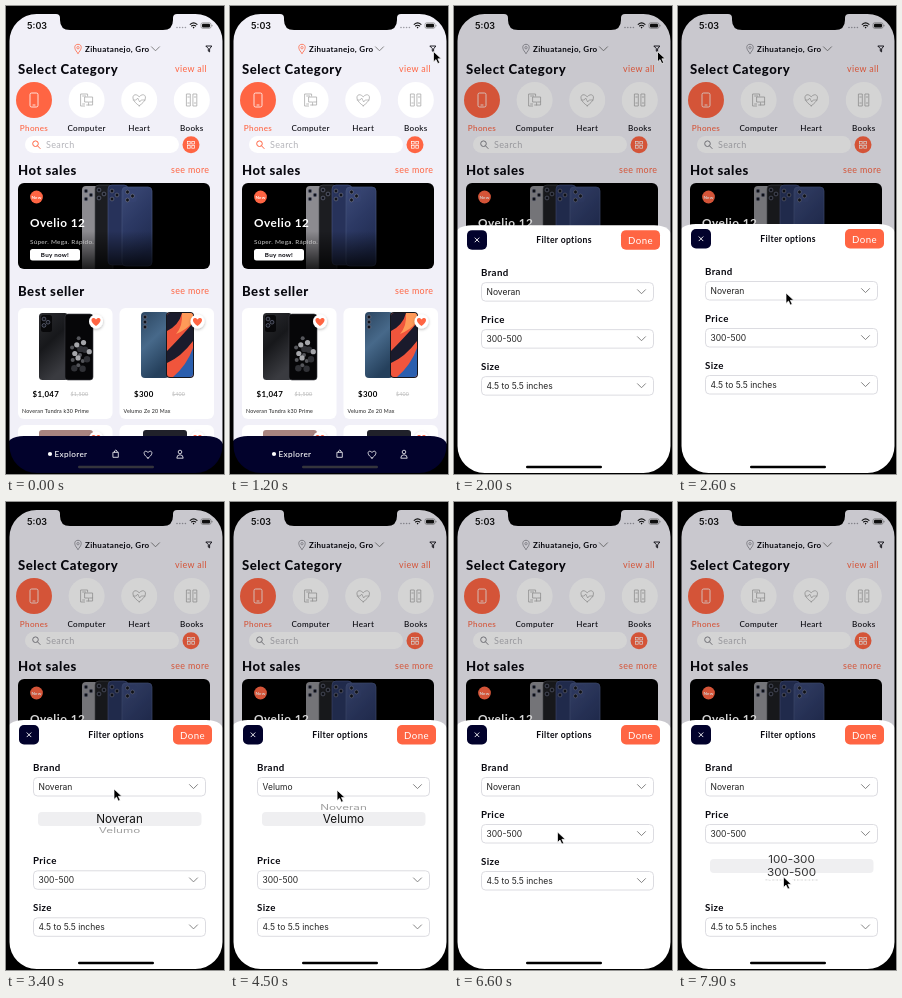
Animation of 218x468 px, one loop 8000 ms. Source, as an HTML page:

```html
<!DOCTYPE html>
<html lang="en">
<head>
<meta charset="utf-8">
<title>Phone shop filter</title>
<style>
html, body { margin: 0; width: 100%; height: 100%; overflow: hidden; background: #000; }
svg { display: block; width: 100vw; height: 100vh; }
text { font-family: Lato, sans-serif; letter-spacing: 0.04em; }
.ui { font-family: Inter, "Liberation Sans", sans-serif; letter-spacing: 0; }
.b { font-weight: 700; }
.h { font-weight: 800; }
.m { text-anchor: middle; }
.line { fill: none; stroke-linecap: round; stroke-linejoin: round; }
.tint * { stroke: var(--tint); }
</style>
</head>
<body>
<svg id="stage" viewBox="0 0 218 468"></svg>
<script>
const ORANGE = '#ff6543', NAVY = '#02022c', INK = '#08080f';
const text = (x, y, size, str, fill = INK, cls = '', extra = '') =>
  `<text x="${x}" y="${y}" font-size="${size}" fill="${fill}" class="${cls}" ${extra}>${str}</text>`;
const rect = (x, y, w, h, r, fill, extra = '') =>
  `<rect x="${x}" y="${y}" width="${w}" height="${h}" rx="${r}" fill="${fill}" ${extra}/>`;
const circle = (x, y, r, fill, extra = '') => `<circle cx="${x}" cy="${y}" r="${r}" fill="${fill}" ${extra}/>`;
const line = (d, color, width = 0.8) => `<path class="line" d="${d}" stroke="${color}" stroke-width="${width}"/>`;
const at = (x, y, body, id = '') => `<g transform="translate(${x} ${y})" ${id && `id="${id}"`}>${body}</g>`;
const tint = body => `<g class="tint">${body}</g>`;
const chevron = (x, y) => line(`M${x - 4} ${y - 2}l4 4 4-4`, '#777', 0.9);
const heart = 'M0 3.6C-7-1-3.2-5.6 0-2 3.2-5.6 7-1 0 3.6z';

function statusBar() {
  const dots = [0, 1, 2, 3].map(i => circle(171 + i * 2.8, 21.5, 0.8, '#9a9aa2')).join('');
  return text(21, 22.5, 9, '5:03', '#111', 'ui', 'font-weight="600"') + dots +
    line('M184.2 18.4q3.4-3 6.8 0M185.5 20q2.1-1.6 4.2 0', '#111', 1.1) + circle(187.6, 21.6, 0.8, '#111') +
    rect(195, 16.8, 10, 5.6, 1.7, 'none', 'stroke="#777" stroke-width=".6"') + rect(196, 17.8, 8, 3.6, 1, '#111') +
    rect(205.6, 18.7, 0.8, 1.8, 0.4, '#777');
}

function header() {
  return tint(line('M72 47.3c-5-5-3.6-9 0-9s5 4 0 9z', ORANGE) + circle(72, 41.7, 1.2, 'none', 'stroke-width=".7"')) +
    text(79, 46, 8, 'Zihuatanejo, Gro', INK, 'b') + chevron(149.5, 42.8) +
    line('M200.2 40h5.6l-2.2 2.9v3l-1.3-.8v-2.2z', INK, 0.9);
}

function categories() {
  const gray = '#aaa';
  const icons = [
    ['Phones', rect(-4, -7, 8, 14, 1.6, 'none', 'stroke="#fff" stroke-width=".8"') + line('M-1 5h2', '#fff')],
    ['Computer', line('M1-4V-6h-7v12h4M-4-4h3M-4 4h2M1 2h-3v-5h8v5h-3M2 2v3M0 5h6V2', gray)],
    ['Heart', `<g transform="scale(1.6)">${line(heart, gray, 0.5)}</g>` + line('M-6 0h3l1.5-2 2 4 1.5-2h4', gray, 0.7)],
    ['Books', line('M-5-6h3.5V6h-3.5zM1.5-6h3.5V6h-3.5zM-4-3h1.5M2.5-3h1.5M-4 3h1.5M2.5 3h1.5', gray)]
  ];
  return icons.map(([name, icon], i) => {
    const x = 28 + i * 52.6;
    return circle(x, 94, 18, i ? '#fff' : ORANGE) + at(x, 94, icon) +
      text(x, 124.8, 8.1, name, i ? INK : ORANGE, 'm', 'font-weight="500"');
  }).join('');
}

function search() {
  const tiles = [-3.4, 0.8].flatMap(x => [-3.4, 0.8].map(y =>
    rect(x, y, 2.6, 2.6, 0, 'none', 'stroke="#fff" stroke-width=".7"'))).join('');
  return rect(19, 130, 154, 17, 8.5, '#fff') +
    tint(circle(29.5, 137.7, 2.8, 'none') + line('M31.6 139.9l2.5 2.6', ORANGE, 1)) +
    text(40, 142, 9, 'Search', '#b4b4ba') + circle(185, 138.8, 8.5, ORANGE) + at(185, 138.8, tiles);
}

const title = (y, name, link, x) => text(12, y, 13.1, name, INK, 'h') + text(x, y - 1.7, 8.9, link, ORANGE);

function lens(x, y, n, gap = 5) {
  return Array.from({ length: n }, (_, i) =>
    circle(x + (i % 2) * gap, y + i * gap * 0.8, 1.9, '#11131b', 'stroke="#777d92" stroke-width=".6"')).join('');
}

function banner() {
  return `<g clip-path="url(#banner)">` + rect(12, 177, 192, 86, 0, '#000') +
    rect(76, 180, 20, 90, 4, '#8c8b90') + lens(80, 185, 3) +
    rect(89, 179, 18, 90, 4, '#1c1d21', 'stroke="#4c4d53" stroke-width=".6"') + lens(93, 184, 3) +
    rect(102, 179, 20, 80, 4, '#27325a', 'stroke="#4a5680" stroke-width=".6"') + lens(106, 185, 3) +
    rect(116, 181, 30, 79, 4, 'url(#blue)', 'stroke="#46537d" stroke-width=".7"') +
    rect(118, 183, 13, 13, 3.5, '#354270') + lens(121.5, 186, 3) +
    rect(70, 225, 80, 38, 0, 'url(#fade)') + '</g>' +
    circle(30.5, 191, 6.4, ORANGE) + text(30.5, 192.6, 4.5, 'New', '#fff', 'm b') +
    text(24, 221, 11.8, 'Ovelio 12', '#fff', 'b') + text(24, 238.3, 6.4, 'Súper. Mega. Rápido.', '#ccc') +
    rect(24, 243, 50, 11.5, 2.5, '#fff') + text(49, 251, 6.3, 'Buy now!', INK, 'm b');
}

// Bubbles packed along a golden-angle spiral.
const bubbles = Array.from({ length: 16 }, (_, i) => {
  const r = 3.1 * Math.sqrt(i), a = i * 2.4;
  return circle(74 + r * Math.cos(a) * 0.85, 349 + r * Math.sin(a) * 1.4, 2 + i % 3 * 0.6, ['#55565b', '#a5a6aa', '#303136'][i % 3]);
}).join('');
const darkPhones = rect(33, 307, 29, 67, 3.5, 'url(#dark)') + rect(35, 309, 11, 17, 2.5, '#08080a') + lens(38, 313, 3, 4) +
  rect(59, 308, 28, 66, 3, '#060608', 'stroke="#3a3b40" stroke-width=".6"') + bubbles;
const colorPhones = rect(135, 306, 28, 66, 4, 'url(#steel)') + lens(139, 311, 1) + lens(139, 316, 1) + lens(139, 321, 1) +
  rect(160, 306, 28, 66, 4, '#15161d') + rect(161, 307, 26, 64, 3, '#f0553c') +
  '<path d="M161 325V310q0-3 3-3h12q-3 12-15 18zM161 345q12-12 26-28v18q-12 16-26 22z" fill="#1a1b2c"/>' +
  '<path d="M176 307h8q3 0 3 3v6q-7 8-17 12 7-8 6-21z" fill="#ff9a58"/><path d="M187 342v26q0 3-3 3h-17q14-12 20-29z" fill="#2b5fae"/>';

function card(x, y, photo, price, old, name) {
  return rect(x, y, 94.5, 111, 6, '#fff') + photo +
    circle(x + 78, y + 13.5, 7, '#fff', 'filter="url(#soft)"') +
    at(x + 78, y + 13.8, `<path d="${heart}" fill="${ORANGE}" transform="scale(1.15)"/>`) +
    text(x + 14.5, y + 89, 7.9, price, '#000', 'b') +
    text(x + 52.5, y + 88, 5.3, old, '#bbb', '', 'text-decoration="line-through"') +
    text(x + 4, y + 105.2, 5.3, name, '#222');
}

function nav() {
  return `<path d="M0 468V444q0-14 18-14H200q18 0 18 14v24z" fill="${NAVY}"/>` +
    circle(44, 448, 2.1, '#fff') + text(48.5, 451, 8.2, 'Explorer', '#fff', '', 'font-weight="500"') +
    line('M107.3 446.3h5v5h-5zM108.5 446v-1q1.3-2 2.6 0v1', '#fff') +
    at(142, 448.5, line(heart, '#fff')) +
    circle(174, 446, 1.8, 'none', 'stroke="#fff" stroke-width=".8"') + line('M170.8 451.8q0-3 3.2-3t3.2 3z', '#fff') +
    rect(72, 459.8, 76, 2.4, 1.2, '#34343c');
}

const field = (label, y, id) => text(27, y, 9.7, label, INK, 'b') +
  rect(27.5, y + 6.5, 172, 18.5, 4, '#fff', 'stroke="#d9d9de" stroke-width=".9"') +
  text(32.5, y + 19, 8.5, '', '#222', 'ui', `id="${id}"`) + chevron(187.5, y + 15.6);

const picker = (id, items, y) => `<g id="${id}">` + rect(32, y - 7, 163.5, 14, 4, '#efeff1') +
  items.map(item => text(0, 4.2, 11.7, item, '#111', 'ui m')).join('') + '</g>';

const BRANDS = ['Noveran', 'Velumo'], PRICES = ['100-300', '300-500', '500-1000'];
const BRAND_Y = 317, PRICE_Y = 364;

function sheet() {
  return `<g id="sheet"><path d="M0 500V232q0-14 18-14H200q18 0 18 14v268z" fill="#fff"/>` +
    rect(13, 223, 20, 19.5, 5, NAVY) + line('M21 230.8l4 4M25 230.8l-4 4', '#fff', 0.9) +
    text(110, 236, 8.6, 'Filter options', INK, 'm b') +
    rect(167, 223, 39, 19.5, 5, ORANGE) + text(186.5, 236.5, 9.7, 'Done', '#fff', 'm') +
    field('Brand', 269, 'brandValue') + picker('brandPicker', BRANDS, BRAND_Y) +
    at(0, 0, field('Price', 316, 'priceValue'), 'priceField') + picker('pricePicker', PRICES, PRICE_Y) +
    at(0, 0, field('Size', 363, 'sizeValue'), 'sizeField') + '</g>';
}

const bezel = '<path fill-rule="evenodd" d="M0 0h218v468H0zM30.5 8h159a27 27 0 0 1 27 27v405a27 27 0 0 1-27 27h-159a27 27 0 0 1-27-27v-405a27 27 0 0 1 27-27z"/>' +
  '<path d="M50 7v1q4 0 4 4v2q0 10 10 10h93q10 0 10-10v-2q0-4 4-4v-1z"/>';

const gradient = (id, ...colors) => `<linearGradient id="${id}" x2=".4" y2="1">` +
  colors.map((c, i) => `<stop offset="${i / (colors.length - 1)}" stop-color="${c}"/>`).join('') + '</linearGradient>';

document.getElementById('stage').innerHTML = `<defs>
  <clipPath id="banner">${rect(12, 177, 192, 86, 6, '#000')}</clipPath>
  <filter id="soft" x="-50%" y="-50%" width="200%" height="200%"><feDropShadow dx="0" dy="1" stdDeviation="1.4" flood-opacity=".3"/></filter>
  ${gradient('blue', '#3d4b78', '#2c3964', '#202b50')}
  ${gradient('dark', '#2a2b2f', '#17181b', '#3a3b40')}
  ${gradient('steel', '#2c4661', '#47698a', '#25405c')}
  <linearGradient id="fade" x2="0" y2="1"><stop stop-opacity="0"/><stop offset="1" stop-opacity=".8"/></linearGradient>
</defs>` +
  rect(0, 0, 218, 468, 0, '#f1f0f8') + statusBar() + header() +
  title(68, 'Select Category', 'view all', 169) + categories() + search() +
  title(169, 'Hot sales', 'see more', 165) + banner() +
  title(290, 'Best seller', 'see more', 165) +
  card(12, 302, darkPhones, '$1,047', '$1,500', 'Noveran Tundra k30 Prime') +
  card(113.5, 302, colorPhones, '$300', '$400', 'Velumo Ze 20 Max') +
  card(12, 419, rect(33, 424, 54, 30, 3, '#a98580'), '', '', '') +
  card(113.5, 419, rect(137, 424, 44, 30, 3, '#20212a'), '', '', '') + nav() +
  rect(0, 0, 218, 468, 0, '#000', 'id="dim"') + sheet() +
  rect(72, 459.8, 76, 2.4, 1.2, '#000', 'id="homeBar"') + bezel +
  at(0, 0, '<path d="M0 0v10.4l2.5-2.3 1.8 4 1.9-.9-1.8-3.9h3.4z" stroke="#fff" stroke-width=".7"/>', 'cursor');

const stage = document.getElementById('stage');
const el = Object.fromEntries([...stage.querySelectorAll('[id]')].map(e => [e.id, e]));
el.sizeValue.textContent = '4.5 to 5.5 inches';
el.priceValue.textContent = '300-500';

const smooth = u => u * u * (3 - 2 * u);
const easeOut = u => 1 - (1 - u) ** 3;

// Value at time t along keys of [time, value], eased between neighbours.
function track(t, keys, ease = smooth, col = 1) {
  const next = keys.findIndex(k => k[0] > t);
  if (next === 0) return keys[0][col];
  if (next < 0) return keys[keys.length - 1][col];
  const a = keys[next - 1], b = keys[next];
  return a[col] + (b[col] - a[col]) * ease((t - a[0]) / (b[0] - a[0]));
}

const POINTER = [
  [300, 224, 110], [900, 203.5, 45.5], [2050, 203.5, 45.5], [2550, 108, 287], [3450, 108, 287],
  [3800, 109, 327], [4250, 108, 303], [4550, 107, 287], [5400, 107, 287], [5600, 106, 294],
  [5700, 106, 305], [6000, 106, 325], [6150, 106, 287], [6400, 106, 287], [6580, 103.5, 330],
  [6900, 103.5, 330], [7250, 105.5, 362], [7450, 105.5, 362], [7900, 105.5, 375], [8000, 105.5, 379]
];
const SHEET_RISE = [[1400, 0], [2120, 1]];
const BRAND_OPEN = [[2650, 0], [3000, 1], [4600, 1], [4850, 0], [5100, 0], [5400, 1], [6100, 1], [6400, 0]];
const BRAND_POS = [[3850, 0], [4200, 1], [5650, 1], [6000, 0]];
const PRICE_OPEN = [[6750, 0], [7050, 1]];
const PRICE_POS = [[7450, 1], [7900, 0.5], [8000, 0.35]];
const GAP = 46.3;

const move = (node, x, y) => node.setAttribute('transform', `translate(${x} ${y})`);

function turnWheel(node, y, pos, open) {
  node.setAttribute('opacity', open);
  node.querySelectorAll('text').forEach((item, i) => {
    const d = i - pos, angle = Math.max(-1.55, Math.min(1.55, d * 0.94));
    item.setAttribute('transform', `translate(113.5 ${y + 14.8 * Math.sin(angle)}) scale(1 ${Math.cos(angle)})`);
    item.setAttribute('opacity', Math.abs(d) > 1.6 ? 0 : Math.max(0.15, 1 - 0.6 * d * d));
  });
}

const start = performance.now();

function draw() {
  const t = (performance.now() - start) % 8000;
  const rise = track(t, SHEET_RISE, easeOut);
  const brand = track(t, BRAND_OPEN), price = track(t, PRICE_OPEN);
  move(el.sheet, 0, 250 * (1 - rise));
  el.dim.setAttribute('opacity', 0.17 * rise);
  el.homeBar.setAttribute('opacity', rise);
  stage.style.setProperty('--tint', rise > 0 ? '#85858c' : ORANGE);
  move(el.priceField, 0, GAP * brand);
  move(el.sizeField, 0, GAP * (brand + price));
  turnWheel(el.brandPicker, BRAND_Y, track(t, BRAND_POS), brand);
  turnWheel(el.pricePicker, PRICE_Y, track(t, PRICE_POS), price);
  el.brandValue.textContent = BRANDS[t > 4300 && t < 6050 ? 1 : 0];
  move(el.cursor, track(t, POINTER), track(t, POINTER, smooth, 2));
  requestAnimationFrame(draw);
}
draw();
</script>
</body>
</html>
```
